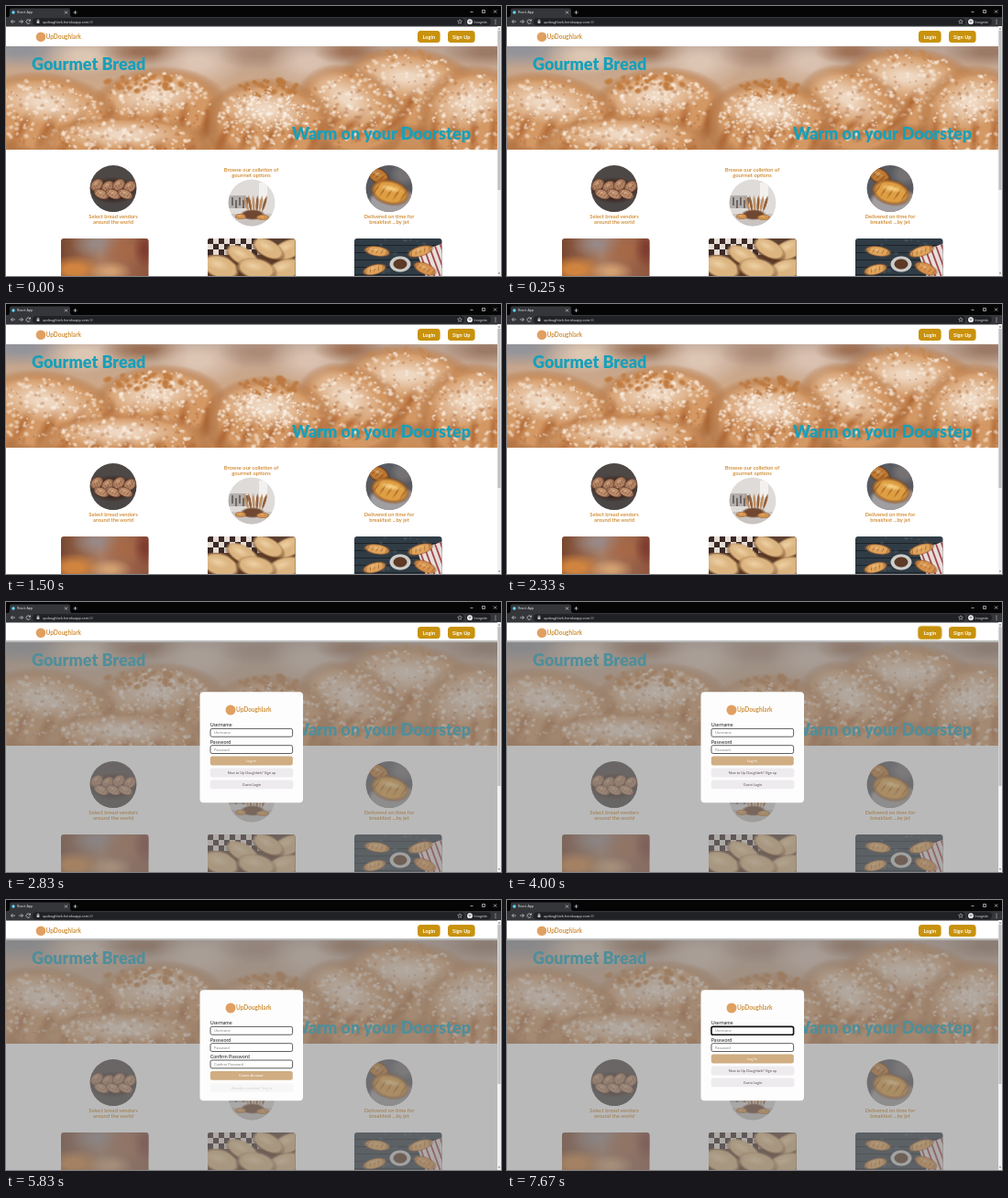
An HTML page with a canvas that plays this animation: 540x295 px, repeating every 8000 ms.

```html
<!DOCTYPE html>
<html lang="en">
<head>
<meta charset="utf-8">
<title>React App</title>
<style>
  html, body { margin: 0; width: 100%; height: 100%; overflow: hidden; background: #fff; }
  canvas, svg { position: absolute; left: 0; top: 0; width: 540px; height: 295px; }
  text { font-family: Lato, sans-serif; }
  .ui text { font: 3.7px "Open Sans", sans-serif; fill: #e8eaed; }
  .ui path { fill: none; stroke: #d5d7da; stroke-width: .7; }
  .hero { font-size: 18px; font-weight: 900; fill: #17a0ba; }
  .brand { font-size: 6.5px; font-weight: 700; fill: #d0913a; }
  .cap { font-size: 5.8px; font-weight: 600; fill: #cd8528; }
  .cap, .btn, .mid { text-anchor: middle; }
  .btn { font-size: 5.7px; font-weight: 700; fill: #fff; }
  .label { font-size: 5.4px; fill: #222; }
  .hint { font-size: 4px; fill: #858585; }
  .mid { font-size: 3.9px; fill: #5b5358; }
  .mid.on { fill: #fff; }
  .field { fill: #fff; stroke: #4a4a4a; stroke-width: .9; }
  .main { fill: #d0ad82; }
  .link { fill: #eeebee; }
</style>
</head>
<body>
<canvas id="photos" width="540" height="295"></canvas>
<svg viewBox="0 0 540 295">
  <g class="ui">
    <rect width="540" height="13" fill="#050506"/>
    <path d="M2 12.5Q4 12 4 9V4.500Q4 2.500 6 2.500H68Q70 2.500 70 4.500V9Q70 12 72 12.500Z" style="fill:#35363a;stroke:none"/>
    <rect y="12" width="540" height="10.500" fill="#35363a"/>
    <rect x="29" y="13.200" width="471" height="8" rx="4" fill="#202124"/>
    <circle cx="8" cy="7" r="1.700" fill="#61dafb"/>
    <text x="12" y="8.400">React App</text>
    <path d="M64 5.500l3 3m0-3l-3 3M73.500 7h4m-2-2v4M10 17H5.500m2-2l-2 2 2 2M14 17h4.500m-2-2l2 2-2 2"/>
    <path d="M26.200 16a2.200 2.200 0 1 0 .1 2M26.500 14.500v1.800h-1.800"/>
    <path d="M506.500 6.500h3M519.500 4.500h3v3h-3zM532 4.500l3.200 3.200m0-3.200l-3.200 3.200"/>
    <rect x="33.600" y="16.500" width="2.800" height="2.300" fill="#d5d7da"/>
    <path d="M34.200 16.500v-.8a.8.8 0 0 1 1.600 0v.8"/>
    <text x="40" y="18.500">updoughlark.herokuapp.com<tspan fill="#9aa0a6">/#/</tspan></text>
    <path d="M495 14.700l.7 1.600 1.700.1-1.300 1.200.4 1.700-1.500-.9-1.500.9.4-1.700-1.300-1.200 1.700-.1z" style="stroke-width:.5"/>
    <rect x="502" y="13.200" width="27" height="8" rx="4" fill="#202124"/>
    <circle cx="506" cy="17.200" r="2.900" fill="#f1f3f4"/>
    <path d="M504.500 16.700h3M505 18.200h.6m.8 0h.6" style="stroke:#333"/>
    <text x="510.500" y="18.500" style="font-size:3.300px">Incognito</text>
    <path d="M534 14.800v1m0 1v1m0 1v1" style="stroke-width:1"/>
  </g>

  <circle cx="38" cy="33.800" r="5.300" fill="#e0a062"/>
  <text class="brand" x="43.500" y="36">UpDoughlark</text>
  <rect id="ring" x="448.300" y="26.300" width="26" height="14.600" rx="4" fill="#d9b95c" stroke="#c9a540" stroke-width=".6"/>
  <rect x="449" y="27" width="24.600" height="13" rx="3.500" fill="#c8920c"/>
  <rect x="482" y="27" width="29.600" height="13" rx="3.500" fill="#c8920c"/>
  <text class="btn" x="461.300" y="35.500">Login</text>
  <text class="btn" x="496.800" y="35.500">Sign Up</text>

  <text class="hero" x="28" y="70">Gourmet Bread</text>
  <text class="hero" x="507" y="146" text-anchor="end">Warm on your Doorstep</text>

  <g class="cap">
    <text x="117" y="231.800">Select bread vendors</text>
    <text x="117" y="237.500">around the world</text>
    <text x="267.500" y="181">Browse our colletion of</text>
    <text x="267.500" y="186.700">gourmet options</text>
    <text x="418" y="231.800">Delivered on time for</text>
    <text x="418" y="237.500">breakfast ...by jet</text>
  </g>

  <rect x="536" y="22" width="4" height="273" fill="#f1f1f1"/>
  <rect x="536.400" y="27" width="3.200" height="174" fill="#c1c1c1"/>
  <path d="M536.900 25.500h2.200l-1.100-1.500zM536.900 291.500h2.200l-1.100 1.500z" fill="#555"/>

  <g id="modal">
    <rect y="42" width="536" height="253" fill="#808080" fill-opacity=".55"/>
    <rect x="211.500" y="98.300" width="112.500" height="121" rx="4" fill="#fdfdfd"/>
    <circle cx="245" cy="118" r="5.500" fill="#e0a062"/>
    <text class="brand" x="251" y="120.200">UpDoughlark</text>
    <text class="label" x="222.700" y="136.200">Username</text>
    <rect id="user" class="field" x="223" y="138.400" width="89.600" height="8.800" rx="1.800"/>
    <text class="hint" x="227" y="144.200">Username</text>
    <text class="label" x="222.700" y="154.600">Password</text>
    <rect class="field" x="223" y="156.700" width="89.600" height="8.800" rx="1.800"/>
    <text class="hint" x="227" y="162.500">Password</text>
    <g id="login">
      <rect class="main" x="222.800" y="168.600" width="90" height="9.800" rx="2.500"/>
      <text class="mid on" x="267.500" y="175">Log In</text>
      <g id="toSignup">
        <rect class="link" x="222.800" y="181.600" width="90.500" height="9.800" rx="2.500"/>
        <text class="mid" x="268" y="187.900">New to Up Doughlark? Sign up</text>
      </g>
      <g id="guest">
        <rect class="link" x="222.800" y="194.400" width="90.500" height="9.800" rx="2.500"/>
        <text class="mid" x="268" y="200.700">Guest Login</text>
      </g>
    </g>
    <g id="signup">
      <text class="label" x="222.700" y="172.900">Confirm Password</text>
      <rect class="field" x="223" y="175" width="89.600" height="8.800" rx="1.800"/>
      <text class="hint" x="227" y="180.800">Confirm Password</text>
      <rect class="main" x="222.800" y="186.900" width="90" height="9.800" rx="2.500"/>
      <text class="mid on" x="267.500" y="193.200">Create Account</text>
      <g id="toLogin">
        <rect class="link" x="222.800" y="200.200" width="90.500" height="9.800" rx="2.500"/>
        <text class="mid" x="268" y="206.500">Already a member? Log in</text>
      </g>
    </g>
  </g>
</svg>
<script>
const $ = id => document.getElementById(id);
const ctx = $('photos').getContext('2d');

let seed = 7;
const rnd = (a, b) => {
  seed = (seed * 16807) % 2147483647;
  return a + (b - a) * seed / 2147483647;
};

// Runs draw() inside a clip; then restores the canvas.
function clipped(shape, draw) {
  ctx.save();
  ctx.beginPath();
  shape();
  ctx.clip();
  draw();
  ctx.restore();
}

function fill(x, y, w, h, color) {
  ctx.fillStyle = color;
  ctx.fillRect(x, y, w, h);
}

// Ellipse shaded from its centre; core is how far the solid part reaches.
function blob(x, y, rx, ry, rgb, alpha = 1, core = 0, turn = 0) {
  ctx.save();
  ctx.translate(x, y);
  ctx.rotate(turn);
  ctx.scale(rx, ry);
  const g = ctx.createRadialGradient(0, 0, 0, 0, 0, 1);
  g.addColorStop(core, `rgba(${rgb},${alpha})`);
  g.addColorStop(1, `rgba(${rgb},0)`);
  ctx.fillStyle = g;
  ctx.fillRect(-1, -1, 2, 2);
  ctx.restore();
}

function dust(n, x, y, rx, ry, rgb, alpha, size) {
  for (let i = 0; i < n; i++) {
    const a = rnd(0, 6.283), r = Math.sqrt(rnd(0, 1)), s = rnd(.4, 1) * size;
    blob(x + Math.cos(a) * r * rx, y + Math.sin(a) * r * ry, s * 1.3, s, rgb, alpha, .3, rnd(-1, 1));
  }
}

// A crusty bread with ridges across it.
function bread(x, y, rx, ry, turn = 0, rgb = '214,152,84', dark = '140,78,34') {
  blob(x, y, rx * 1.12, ry * 1.15, dark, .85, .75, turn);
  blob(x, y, rx, ry, rgb, 1, .75, turn);
  for (let k = -2; k <= 2; k++) {
    const d = k * rx * .36;
    blob(x + Math.cos(turn) * d, y + Math.sin(turn) * d, rx * .07, ry * .75, dark, .6, .1, turn + .35);
  }
  blob(x - rx * .1, y - ry * .3, rx * .5, ry * .35, '250,215,160', .5, 0, turn);
}

function banner() {
  const g = ctx.createLinearGradient(0, 44, 0, 157);
  g.addColorStop(0, '#b9a294');
  g.addColorStop(.4, '#cfa887');
  g.addColorStop(1, '#c98d58');
  fill(0, 44, 536, 113, g);
  [
    [15, 48, 60, 20, '140,145,155'], [85, 55, 45, 22, '225,205,185'],
    [150, 50, 50, 14, '150,105,75'], [210, 62, 50, 28, '226,203,186'],
    [275, 52, 45, 18, '170,135,115'], [330, 62, 45, 26, '222,198,182'],
    [375, 50, 40, 14, '155,105,75'], [525, 50, 50, 16, '150,115,95']
  ].forEach(b => blob(...b, .85, .2));
  [
    [165, 112, 75, 46, -.1], [45, 120, 80, 48, .15], [440, 92, 80, 48, .1],
    [375, 116, 62, 50, .5], [510, 122, 60, 58, -.3], [130, 150, 95, 32, 0], [288, 128, 70, 50, .1]
  ].forEach(([x, y, rx, ry, turn]) => {
    blob(x, y + 3, rx * 1.06, ry * 1.06, '135,72,32', .75, .7, turn);
    blob(x, y, rx, ry, '211,152,100', 1, .75, turn);
    for (let i = -2; i < 3; i++)
      blob(x + i * rx * .36, y + ry * .3, rx * .1, ry * .6, '166,90,38', .65, .1, .35 + turn);
    blob(x - 4, y - ry * .3, rx * .75, ry * .5, '246,232,218', .8, .15, turn);
    dust(130, x, y - ry * .1, rx * .8, ry * .75, '255,248,240', .5, 3.2);
    dust(50, x, y, rx * .8, ry * .8, '165,92,42', .35, 2.8);
  });
  dust(32, 150, 84, 42, 9, '193,123,62', .9, 4.5);
  dust(30, 287, 90, 34, 9, '188,120,62', .9, 4.500);
  dust(14, 430, 54, 34, 6, '196,135,80', .8, 4);
  dust(90, 288, 120, 52, 26, '255,252,248', .6, 2.6);
}

function disc(x, y, draw) {
  clipped(() => ctx.arc(x, y, 25.4, 0, 7), () => draw(x, y));
}

function card(x, draw) {
  clipped(() => ctx.roundRect(x, 254, 95.5, 60, 3), () => draw(x, 254));
}

function photos() {
  clipped(() => ctx.rect(0, 44, 536, 113), banner);

  disc(117, 199.5, (x, y) => {
    fill(x - 26, y - 26, 52, 52, '#4d4846');
    blob(x, y + 20, 28, 12, '75,70,70', 1, .4);
    blob(x, y + 2, 27, 15, '58,38,30', 1, .6);
    for (let i = 0; i < 4; i++) bread(x - 18 + i * 12, y - 4 + i % 2 * 2, 8, 6, -.7, '176,128,98', '88,52,38');
    for (let i = 0; i < 3; i++) bread(x - 13 + i * 13, y + 6, 9, 5, .4, '186,138,106', '88,52,38');
  });

  disc(268, 215, (x, y) => {
    fill(x - 26, y - 26, 52, 52, '#dedbd8');
    fill(x - 26, y - 8, 20, 14, '#b4aeac');
    fill(x + 8, y - 22, 9, 18, '#f3f1ef');
    fill(x - 26, y + 12, 52, 14, '#c9c4c1');
    for (let i = 0; i < 5; i++) fill(x - 22 + i * 4, y - 6 + i % 2 * 3, 2, 9, '#6f6967');
    for (let i = 0; i < 6; i++) blob(x - 6 + i * 4, y + 1, 1.8, 10, i % 2 ? '150,98,62' : '193,144,98', 1, .6, i * .12 - .3);
    blob(x + 1, y + 13, 14, 6, '112,72,50', 1, .7);
    bread(x + 12, y + 16, 7, 3);
    bread(x - 12, y + 15, 6, 3);
  });

  disc(418, 199.5, (x, y) => {
    fill(x - 26, y - 26, 52, 52, '#585a61');
    blob(x + 16, y - 16, 16, 14, '125,120,120', .8, .4);
    blob(x + 4, y + 15, 28, 17, '160,158,160', 1, .8);
    bread(x - 12, y - 14, 13, 8, .5, '192,122,52', '95,48,18');
    bread(x + 1, y + 4, 21, 13, .25, '222,158,66', '135,70,22');
    blob(x + 3, y, 12, 3.500, '250,212,130', .8, .2, .25);
  });

  card(60, (x, y) => {
    const g = ctx.createLinearGradient(x, 0, x + 96, 0);
    g.addColorStop(0, '#794730');
    g.addColorStop(.45, '#a97c62');
    g.addColorStop(1, '#8f533b');
    fill(x, y, 96, 41, g);
    blob(x + 38, y + 6, 28, 16, '150,139,140', .9, .1);
    blob(x + 70, y + 14, 26, 20, '168,105,70', .8, .2);
    blob(x + 14, y + 34, 32, 16, '212,134,62', .95, .3);
    blob(x + 54, y + 36, 24, 12, '222,170,118', .8, .2);
    blob(x + 92, y + 12, 14, 20, '122,54,44', .8, .2);
  });

  card(220, (x, y) => {
    fill(x, y, 96, 41, '#5c3f30');
    for (let i = 0; i < 10; i++)
      for (let j = 0; j < 3; j++)
        fill(x + i * 6, y + j * 6, 6, 6, (i + j) % 2 ? '#e6ddd4' : '#3a2927');
    [[14, 31, 22, 13, .3], [88, 12, 20, 11, -.4], [66, 11, 19, 10, .5], [38, 19, 20, 10, .5],
     [84, 34, 22, 12, -.3], [53, 33, 22, 12, .2]].forEach(([dx, dy, rx, ry, turn]) => {
      blob(x + dx, y + dy + 2, rx * 1.1, ry * 1.15, '92,52,25', .9, .7, turn);
      blob(x + dx, y + dy, rx, ry, '219,180,128', 1, .78, turn);
      blob(x + dx - 3, y + dy - 3, rx * .6, ry * .5, '240,212,168', .8, .1, turn);
    });
  });

  card(380, (x, y) => {
    fill(x, y, 96, 41, '#303c45');
    for (let j = 0; j < 5; j++) fill(x, y + 7 + j * 8, 96, 1, '#1b242b');
    dust(30, x + 48, y + 20, 48, 20, '95,112,122', .3, 3);
    ctx.save();
    ctx.translate(x + 80, y + 24);
    ctx.rotate(-.35);
    fill(-8, -12, 36, 40, '#e6dfdc');
    for (let i = 0; i < 6; i++) fill(-6 + i * 6, -12, 1.8, 40, '#a4484a');
    ctx.restore();
    blob(x + 50, y + 28, 12, 9, '205,205,202', 1, .9);
    blob(x + 50, y + 28, 8, 6, '92,58,38', 1, .85);
    bread(x + 25, y + 14, 14, 5.5, .15, '224,164,92');
    bread(x + 72, y + 14, 14, 5.5, -.3, '224,164,92');
    bread(x + 22, y + 34, 13, 5.5, -.25, '224,164,92');
    bread(x + 77, y + 33, 13, 6, .4, '216,148,78');
  });
}

const show = (id, on) => $(id).style.display = on ? '' : 'none';
const ramp = (t, a, b) => Math.min(1, Math.max(0, (t - a) / (b - a)));
const fade = (id, amount) => $(id).style.opacity = 1 - .72 * amount;

function render(t) {
  const signup = t >= 4750 && t < 6420;
  show('modal', t >= 2830);
  show('ring', t >= 3170 && t < 4750);
  show('signup', signup);
  show('login', !signup);
  fade('toSignup', t < 4750 ? ramp(t, 4120, 4330) : 0);
  fade('toLogin', ramp(t, 5450, 5830));
  fade('guest', t >= 6420 ? 1 - ramp(t, 6620, 6830) : 0);
  const focus = ramp(t, 7400, 7500);
  $('user').style.strokeWidth = .9 + .7 * focus;
  $('user').style.stroke = focus ? '#111' : '';
}

function tick() {
  render(performance.now() % 8000);
  requestAnimationFrame(tick);
}

photos();
tick();
</script>
</body>
</html>
```
